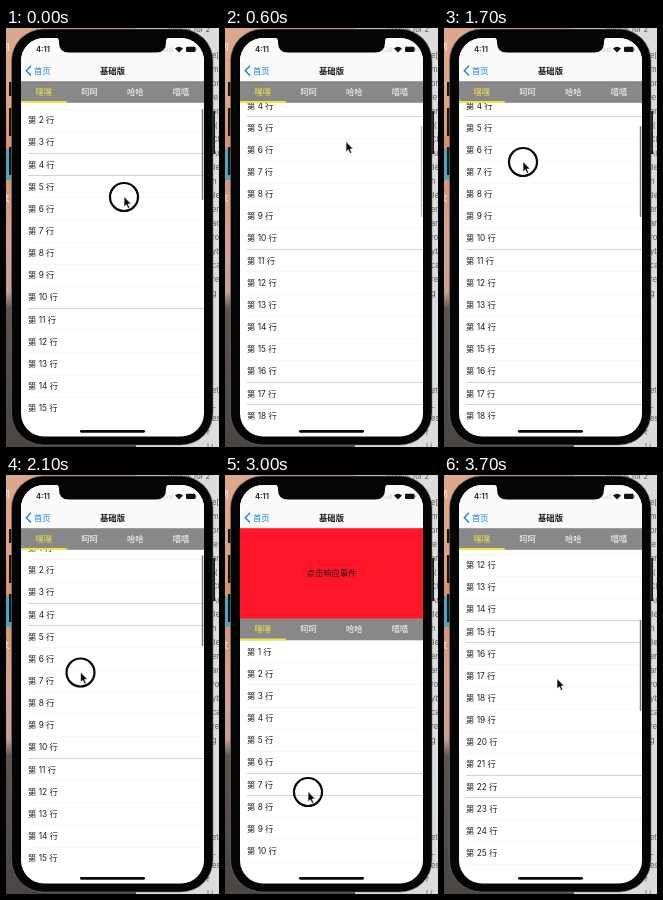
Recreate the animation shown at these times as an HTML page. Size 213 by 419 pixels, loop 3.8 s.

```html
<!DOCTYPE html>
<html lang="zh">
<head>
<meta charset="utf-8">
<style>
  html, body { margin: 0; width: 100%; height: 100%; overflow: hidden; background: #ddd; }
  svg { display: block; width: 100vw; height: 100vh; }
  text { font: 8.3px Inter, "Noto Sans CJK SC", "Noto Sans CJK", sans-serif; fill: #1c1c1c; }
  .mid { text-anchor: middle; }
  .desk text { font-size: 7.5px; fill: #555; }
</style>
</head>
<body>
<svg viewBox="0 0 213 419" preserveAspectRatio="none">
  <defs>
    <linearGradient id="wall" x2="0" y2="1">
      <stop offset="0" stop-color="#d9a88e"/>
      <stop offset=".15" stop-color="#e2a685"/>
      <stop offset=".3" stop-color="#d98f62"/>
      <stop offset=".5" stop-color="#d6a592"/>
      <stop offset=".63" stop-color="#c9a092"/>
      <stop offset=".67" stop-color="#5d544f"/>
      <stop offset="1" stop-color="#4a4644"/>
    </linearGradient>
    <clipPath id="screen"><rect x="15" y="10" width="183" height="398.5" rx="23"/></clipPath>
    <clipPath id="body"><rect x="15" y="53" width="183" height="338.5"/></clipPath>
    <clipPath id="listClip"><rect id="listBox" x="15" width="183"/></clipPath>
  </defs>

  <g class="desk">
    <rect width="135" height="419" fill="url(#wall)"/>
    <rect y="121" width="5" height="31" fill="#4fa3c4"/>
    <rect x="130" width="83" height="419" fill="#dcdcdc"/>
    <g id="code"></g>
    <text x="-4" y="22" style="fill:#fff">切</text>
    <text x="-4" y="173" style="fill:#fff">文</text>
  </g>
  <path d="M4.5 54v14M4.5 80v28M4.5 119v28M207.5 83v43" stroke="#161616" stroke-width="3"/>
  <rect x="5.5" y="1" width="201.5" height="416" rx="32" fill="#050505" stroke="#777" stroke-width=".6"/>

  <g clip-path="url(#screen)">
    <rect x="15" y="10" width="183" height="400" fill="#fff"/>
    <g clip-path="url(#body)">
      <g clip-path="url(#listClip)">
        <g id="list"></g>
        <g id="side"></g>
        <rect id="bar" x="195.8" width="1.5" height="91" rx=".75" fill="#777"/>
      </g>
      <g id="head">
        <rect x="15" y="53" width="183" height="91" fill="#ff1729"/>
        <text class="mid" x="106.5" y="101.4">点击响应事件</text>
      </g>
      <g id="tabs">
        <rect x="15" width="183" height="21.8" fill="#888"/>
        <rect id="line" y="20" width="45.75" height="1.9" fill="#f6e640"/>
      </g>
    </g>
    <rect x="15" y="10" width="183" height="43.2" fill="#fafafa"/>
    <path d="M25 37.8l-4.7 4.9 4.7 4.9" fill="none" stroke="#1b82e8" stroke-width="1.4"/>
    <text x="28" y="46" style="fill:#1b82e8">首页</text>
    <text class="mid" x="106.5" y="46" style="font-weight:600">基础版</text>
    <text x="30" y="24.2" style="font-size:7.6px;font-weight:600">4:11</text>
    <path d="M159 22v2M161.4 21v3M163.8 20v4M166.2 19v5" stroke="#ddd" stroke-width="1.4"/>
    <path d="M169 20.4q4-3.4 8 0l-4 4z" fill="#111"/>
    <rect x="180" y="18.8" width="9.6" height="5.2" rx="1.3" fill="#111"/>
    <path d="M190.6 20.5v1.8" stroke="#999" stroke-width=".8"/>
    <rect x="74" y="402" width="65" height="2.7" rx="1.35" fill="#080808"/>
  </g>
  <path d="M49 9.5q4 0 4 4v1q0 10 10 10h87q10 0 10-10v-1q0-4 4-4z" fill="#050505"/>

  <g id="cursor">
    <circle id="ring" r="14" fill="none" stroke="#080808" stroke-width="2.2"/>
    <path d="M0-.5v10.4l2.3-2.2 1.7 3.8 1.8-.8-1.7-3.7h3.2z" fill="#080808" stroke="#fff" stroke-width=".7"/>
  </g>
</svg>
<script>
const LOOP = 3800, STEP = 100, PITCH = 22.15, HEAD = 90.5, TOP = 53, WIDTH = 183, TAB = WIDTH / 4;
const $ = id => document.getElementById(id);

function add(parent, name, attrs, text) {
  const el = document.createElementNS('http://www.w3.org/2000/svg', name);
  for (const k in attrs) el.setAttribute(k, attrs[k]);
  if (text) el.textContent = text;
  return parent.appendChild(el);
}

// Rows are placed relative to the top of the tab bar.
// The crisp hairline shows only where it meets a pixel centre.
function fillList(parent, named, total) {
  for (let i = 0; i < total; i++) {
    const y = 33 + i * PITCH, line = { x: 22, y: y + 11, width: 176 };
    if (i < named) add(parent, 'text', { x: 22, y: y + 3.1 }, `第 ${i + 1} 行`);
    add(parent, 'rect', { ...line, height: 0.5, fill: '#efeff0' });
    add(parent, 'rect', { ...line, height: 0.25, fill: '#d2d2d4', 'shape-rendering': 'crispEdges' });
  }
}
fillList($('list'), 50, 50);
fillList($('side'), 6, 16);

const labels = ['嘿嘿', '呵呵', '哈哈', '嘻嘻'].map((s, i) =>
  add($('tabs'), 'text', { class: 'mid', x: 15 + TAB * (i + 0.5), y: 13.6 }, s));

const addCode = (words, x, y) => words.split(' ').forEach((s, i) =>
  add($('code'), 'text', { x, y: y + i * 14 }, s));
addCode('e[版 m om le ar r( Cl Ar lle h lle en arc roc yb ca re g', 206, 30);
addCode('et _ esse', 206, 365);
addCode('r Li LTD', 201, 407);
add($('code'), 'text', { x: 160, y: 4 }, 'amples for 2');

const ramp = (t, a, b) => Math.min(1, Math.max(0, (t - a) / (b - a)));
const smooth = (t, a, b) => { const u = ramp(t, a, b); return u * u * (3 - 2 * u); };
const easeOut = (t, a, b) => 1 - (1 - ramp(t, a, b)) ** 2;

// Drag up, slow drag down until the header is open, then a fling up.
function scrollAt(t) {
  const dragged = 106.5 + 59 * easeOut(t, 0, 600) - 0.155 * Math.max(0, t - 1700);
  return Math.max(0, dragged) + 345 * smooth(t, 3000, LOOP);
}
const pageAt = t => smooth(t, 950, 1250) - smooth(t, 1300, 1600);

// Stops of the pointer: time, x, y.
const stops = [[0, 118, 169], [500, 121, 114], [600, 121, 114], [800, 86, 64], [1100, 86, 64],
  [1300, 43, 62], [1400, 43, 62], [1700, 79, 134], [2500, 70, 261], [3000, 83, 317], [3400, 113, 204]];
const presses = [[0, 300], [1000, 1100], [1300, 1400], [1700, 3300]];

function pointerAt(t) {
  let x = stops[0][1], y = stops[0][2];
  for (let i = 1; i < stops.length; i++) {
    const [t0, x0, y0] = stops[i - 1], [t1, x1, y1] = stops[i], u = ramp(t, t0, t1);
    x += (x1 - x0) * u;
    y += (y1 - y0) * u;
  }
  return [x, y];
}

const move = (el, x, y) => el.setAttribute('transform', `translate(${x} ${y})`);

function draw(t) {
  const s = scrollAt(t);
  const p = pageAt(t);
  const top = TOP + Math.max(0, HEAD - s);
  const inner = Math.max(0, s - HEAD);
  const shift = -p * WIDTH;

  $('listBox').setAttribute('y', top);
  $('listBox').setAttribute('height', 391.5 - top);
  move($('list'), shift, top - inner);
  move($('side'), shift + WIDTH, top);
  move($('head'), 0, -Math.min(s, 100));
  move($('tabs'), 0, top);

  $('bar').setAttribute('y', 76.5 + inner * 0.286);
  $('bar').setAttribute('opacity', inner > 0 ? 1 - ramp(t, 500, 700) + ramp(t, 1600, 1700) : 0);
  $('line').setAttribute('x', 15 + p * TAB);
  labels.forEach((el, i) => el.style.fill = i === Math.round(p) ? '#f6e640' : '#fff');

  move($('cursor'), ...pointerAt(t));
  const down = presses.some(([a, b]) => t >= a && t <= b);
  $('ring').setAttribute('visibility', down ? 'visible' : 'hidden');
}

const start = performance.now();
function tick() {
  const t = (performance.now() - start) % LOOP;
  draw(Math.floor(t / STEP) * STEP);
  requestAnimationFrame(tick);
}
tick();
</script>
</body>
</html>
```
